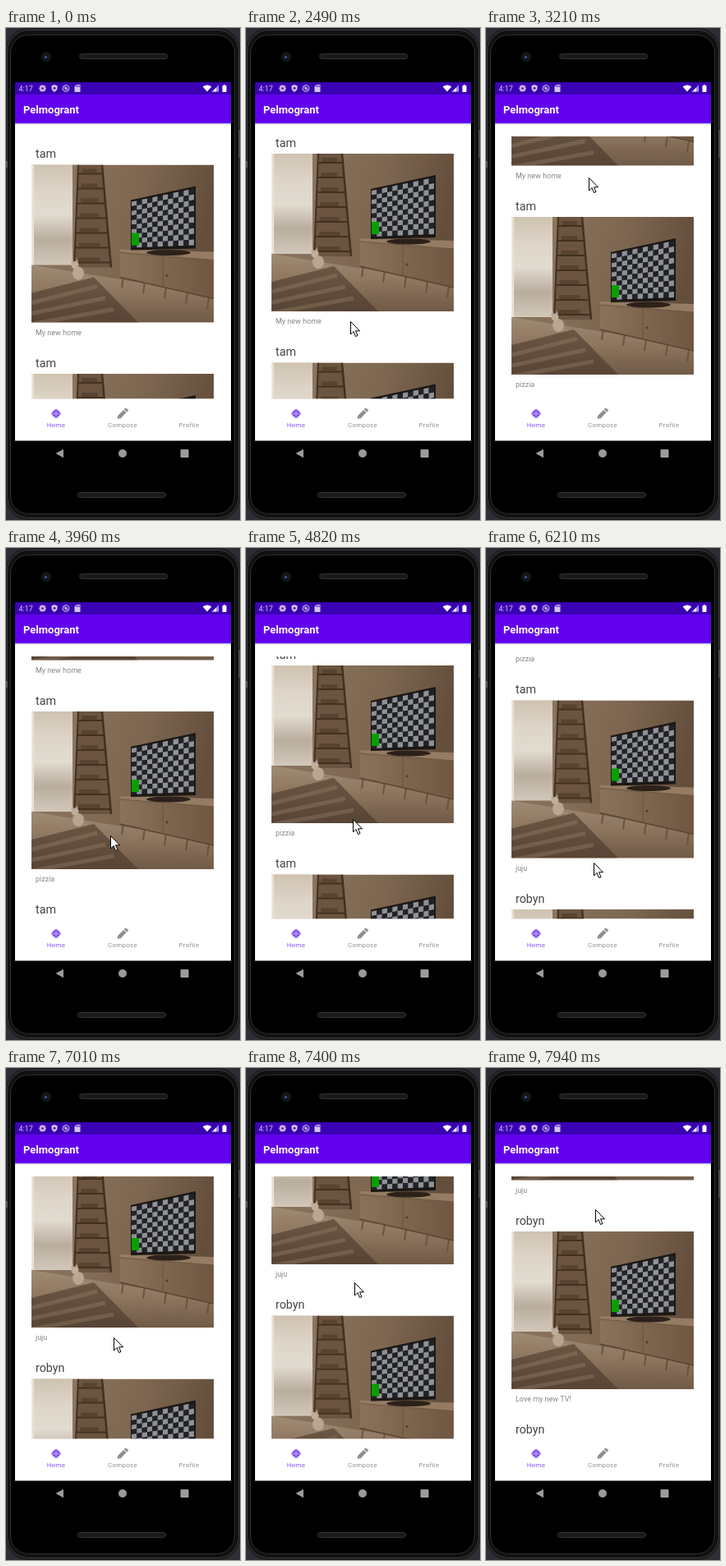
Animation of 285 by 599 pixels, one loop 8000 ms. Source, as an HTML page with a canvas:

```html
<!DOCTYPE html>
<html lang="en">
<head>
<meta charset="utf-8">
<title>Photo feed</title>
<style>
html, body { margin: 0; width: 100%; height: 100%; overflow: hidden; background: #111; }
canvas { display: block; width: 285px; height: 599px; }
</style>
</head>
<body>
<canvas id="stage"></canvas>
<script>
const W = 285, H = 599, LOOP = 8000;
const canvas = document.getElementById('stage');
const dpr = window.devicePixelRatio || 1;
canvas.width = W * dpr;
canvas.height = H * dpr;
const c = canvas.getContext('2d');
const FONT = 'Roboto, "Open Sans", sans-serif';

// The screen refreshes in even steps; the pointer shows from step 0
const FIRST = 584, STEP = 136.1;

// Gestures: step, pointer x, pointer y, scroll offset
const KEYS = [
  [0, 195, 596, 0], [5, 128, 388, 0], [13, 128, 388, 0],
  [14, 127, 357, 13.5], [19, 125, 182, 191], [24, 127, 350, 222],
  [25, 130, 392, 222], [29, 130, 393, 222],
  [31, 130, 330, 278], [35, 120, 184, 420], [37, 123, 145, 490],
  [38, 123, 145, 490], [40, 128, 341, 490], [42, 134, 425, 490], [45, 134, 425, 490],
  [47, 131, 328, 551.5], [54, 133, 172, 731]
];

const POSTS = [['tam', 'My new home'], ['tam', 'pizzia'], ['tam', 'juju'],
  ['robyn', 'Love my new TV!'], ['robyn', '']];
const PITCH = 254.5;

function pose(step) {
  const i = KEYS.findIndex(k => step <= k[0]);
  if (i === 0) return KEYS[0];
  const a = KEYS[i - 1], b = KEYS[i];
  const p = (step - a[0]) / (b[0] - a[0]);
  return a.map((v, n) => v + (b[n] - v) * p);
}

function rect(x, y, w, h, fill) {
  c.fillStyle = fill;
  c.fillRect(x, y, w, h);
}

function round(x, y, w, h, r, fill, stroke) {
  c.beginPath();
  c.roundRect(x, y, w, h, r);
  if (fill) { c.fillStyle = fill; c.fill(); }
  if (stroke) { c.strokeStyle = stroke; c.lineWidth = 1; c.stroke(); }
}

function poly(fill, ...points) {
  c.beginPath();
  for (let i = 0; i < points.length; i += 2) c.lineTo(points[i], points[i + 1]);
  c.closePath();
  c.fillStyle = fill;
  c.fill();
}

// Four-sided face with upright left and right edges
function slab(fill, x1, top1, end1, x2, top2, end2) {
  poly(fill, x1, top1, x2, top2, x2, end2, x1, end1);
}

function dot(x, y, r, fill, ry = r) {
  c.beginPath();
  c.ellipse(x, y, r, ry, 0, 0, 7);
  c.fillStyle = fill;
  c.fill();
}

function line(x1, y1, x2, y2, color, width = 1) {
  c.beginPath();
  c.moveTo(x1, y1);
  c.lineTo(x2, y2);
  c.strokeStyle = color;
  c.lineWidth = width;
  c.stroke();
}

function text(s, x, y, size, color, weight = 400, align = 'left') {
  c.font = `${weight} ${size}px ${FONT}`;
  c.textAlign = align;
  c.fillStyle = color;
  c.fillText(s, x, y);
}

function shade(x1, y1, x2, y2, ...colors) {
  const g = c.createLinearGradient(x1, y1, x2, y2);
  colors.forEach((col, i) => g.addColorStop(i / (colors.length - 1), col));
  return g;
}

const mix = (a, b, p) => a + (b - a) * p;

function windowAndShelf() {
  rect(0, 0, 52, 122, shade(0, 0, 0, 122, '#cfc2b0', '#ddd4c7', '#e2dbd0', '#b9ad9d', '#d2c8ba'));
  rect(0, 0, 3, 122, '#e8e2d8');
  rect(50, 0, 8, 126, '#8b745d');
  poly('#6b5440', 57, 0, 86, 0, 97, 125, 52, 125);
  for (let i = 0; i < 7; i++) {
    const y = 10 + i * 18, left = 57 - y / 25, right = 86 + y / 11.4;
    rect(left, y, right - left, 2, '#41301f');
    rect(left + 5, y - 5, (right - left) * .6, 5, '#57432f');
  }
  line(57, 0, 52, 125, '#423021', 2);
  line(86, 0, 97, 125, '#423021', 2.5);
}

function television() {
  dot(167, 107, 27, '#2c2119', 3.5);
  slab('#1b1714', 121, 43, 104, 200, 26, 102);
  const cols = 12, rows = 10;
  const edge = (u, v) => mix(mix(45, 29, u), mix(101, 98, u), v);
  for (let i = 0; i < cols; i++) {
    for (let j = 0; j < rows; j++) {
      const u = i / cols, u2 = (i + 1) / cols, v = j / rows, v2 = (j + 1) / rows;
      slab((i + j) % 2 ? '#202226' : '#8f9197',
        mix(122, 198, u), edge(u, v), edge(u, v2),
        mix(122, 198, u2), edge(u2, v), edge(u2, v2));
    }
  }
  rect(122, 83, 9, 15, '#08a000');
}

function cabinet() {
  for (let x = 112; x < 222; x += 26) line(x, 136 + (x - 112) / 4, x - 2, 150 + (x - 112) / 4, '#6a533f', 2);
  slab('#947b62', 108, 103, 108, 222, 106, 117);
  slab(shade(108, 0, 222, 0, '#8a725a', '#7c644d', '#6f5742'), 108, 107, 137, 222, 116, 163);
  line(108, 107, 222, 116, '#6b5541');
  line(108, 137, 222, 163, '#594533', 1.5);
  line(160, 111, 160, 149, '#69523f');
  dot(165, 135, 1.4, '#4d3a2b');
}

function cat() {
  dot(57, 132, 7, '#b8a691', 8);
  dot(53, 122, 4.5, '#bfae99');
  for (let x of [50, 55]) poly('#b8a691', x - 2, 120, x, 114, x + 2, 120);
  line(62, 138, 69, 137, '#a08b75', 2);
}

function room(x, y) {
  c.save();
  c.translate(x, y);
  c.beginPath();
  c.rect(0, 0, 222, 192);
  c.clip();
  rect(0, 0, 222, 192, shade(60, 0, 222, 40, '#89725c', '#7d6650', '#634e3c'));
  slab(shade(0, 122, 0, 192, '#a08b74', '#8c745d', '#705a46'), 0, 122, 192, 222, 158, 192);
  poly(shade(0, 140, 0, 192, '#6a5543', '#574435'), 0, 156, 76, 137, 130, 192, 0, 192);
  for (let i = 0; i < 3; i++) line(0, 168 + i * 13, 80 + i * 10, 148 + i * 14, 'rgba(165,142,116,.3)', 5);
  windowAndShelf();
  cabinet();
  television();
  cat();
  c.restore();
}

function feed(scroll) {
  c.save();
  c.beginPath();
  c.rect(11, 132, 263, 319.5);
  c.clip();
  POSTS.forEach(([name, caption], i) => {
    const y = 166.5 + i * PITCH - scroll;
    if (y > 475 || y < -90) return;
    text(name, 36, y - 8.5, 14.3, '#444');
    room(31, y);
    text(caption, 36, y + 207, 9, '#858585');
  });
  c.restore();
}

function body() {
  rect(0, 0, W, H, '#2c2d35');
  round(0, 0, W, H, 27, '#1b1c1e');
  round(1.5, 2.5, 282, 594, 26, '#111', '#3c3e40');
  round(5.5, 8.5, 273, 583, 22, '#000', '#2c2e30');
  rect(0, 162, 2, 8, '#55585a');
  rect(283, 124, 2, 34, '#46494b');
  for (let [x, y] of [[89.5, 31.5], [87.5, 565.5]]) {
    round(x, y, 107, 6, 3, '#191919', '#343434');
  }
  dot(49, 35, 6, '#16181c');
  dot(49, 35, 3.5, '#0e1424');
  dot(48.5, 35.5, 1.6, '#465a8c');
}

function statusBar() {
  const ink = '#d0c3ec', back = '#3a00b3';
  rect(11, 66, 263, 15, back);
  text('4:17', 15.5, 76.8, 9, ink);
  for (let i = 0; i < 4; i++) {
    const a = i * Math.PI / 4, dx = Math.cos(a) * 4.3, dy = Math.sin(a) * 4.3;
    line(44.5 - dx, 73.5 - dy, 44.5 + dx, 73.5 + dy, ink, 1.8);
  }
  dot(44.5, 73.5, 3.2, ink);
  dot(44.5, 73.5, 1.3, back);
  poly(ink, 59, 69, 62.7, 70.5, 62.3, 75, 59, 78.3, 55.7, 75, 55.3, 70.5);
  dot(59, 73.3, 1.4, back);
  dot(73, 73.5, 4.3, ink);
  dot(73, 73.5, 3.2, back);
  dot(73, 73.5, 2, '#a58bdc');
  line(70.5, 71, 75.5, 76, ink);
  poly(ink, 86, 69, 90.5, 69, 90.5, 78, 83.5, 78, 83.5, 71.5);
  for (let i = 0; i < 3; i++) rect(85.7 + i * 1.6, 70, .8, 2, back);

  c.beginPath();
  c.moveTo(245, 77.5);
  c.arc(245, 77.5, 8, Math.PI * 1.27, Math.PI * 1.73);
  c.fillStyle = '#fff';
  c.fill();
  poly('#a995df', 251, 77.5, 259, 77.5, 259, 69.5);
  poly('#eee8fa', 251, 77.5, 256, 77.5, 256, 72.5);
  round(263.5, 70, 5, 8, .7, '#fff');
  rect(265, 69, 2, 1.2, '#fff');
}

function toolbar() {
  rect(11, 81, 263, 35, '#6200ee');
  rect(11, 116, 263, 2.5, shade(0, 116, 0, 118.5, '#c4b6dc', '#fff'));
  text('Pelmogrant', 21, 103.7, 13, '#fff', 700);
}

function tabs() {
  const grey = '#929292', accent = '#8455f3', pale = '#c4aefa';
  rect(11, 451.5, 263, 51, '#fff');
  poly(accent, 61, 463.5, 67, 469.5, 61, 475.5, 55, 469.5);
  dot(61, 469.5, 4.6, accent);
  line(61, 465.5, 61, 473.5, pale);
  line(57, 469.5, 65, 469.5, pale);
  c.save();
  c.translate(142, 469.5);
  c.rotate(-Math.PI / 4);
  poly(grey, -9, 0, -6, -2.4, 4, -2.4, 4, 2.4, -6, 2.4);
  rect(5, -2.4, 3, 4.8, grey);
  c.restore();
  c.letterSpacing = '0.25px';
  ['Home', 'Compose', 'Profile'].forEach((label, i) =>
    text(label, 61 + i * 81, 486.3, 8, i ? grey : accent, 400, 'center'));
  c.letterSpacing = '0px';
}

function navBar() {
  const grey = '#9b9b9b';
  rect(11, 502.5, 263, 30.5, '#000');
  poly(grey, 60.5, 518, 70, 512.8, 70, 523.2);
  dot(142, 518, 5, grey);
  round(212.5, 513, 10, 10, 1, grey);
}

function pointer(x, y) {
  c.save();
  c.translate(Math.round(x) + .5, Math.round(y) + .5);
  poly('#fff', 0, 0, 0, 15.5, 3.5, 12, 6, 18, 8.5, 17, 6, 11.3, 11, 11.3);
  c.strokeStyle = '#000';
  c.lineWidth = 1;
  c.stroke();
  c.restore();
}

function draw() {
  const step = Math.floor((performance.now() % LOOP - FIRST) / STEP);
  const [, x, y, scroll] = pose(Math.max(0, step));
  c.setTransform(dpr, 0, 0, dpr, 0, 0);
  body();
  rect(11, 66, 263, 437, '#fff');
  feed(scroll);
  statusBar();
  toolbar();
  tabs();
  navBar();
  if (step >= 0) pointer(x, y);
  requestAnimationFrame(draw);
}
draw();
</script>
</body>
</html>
```
